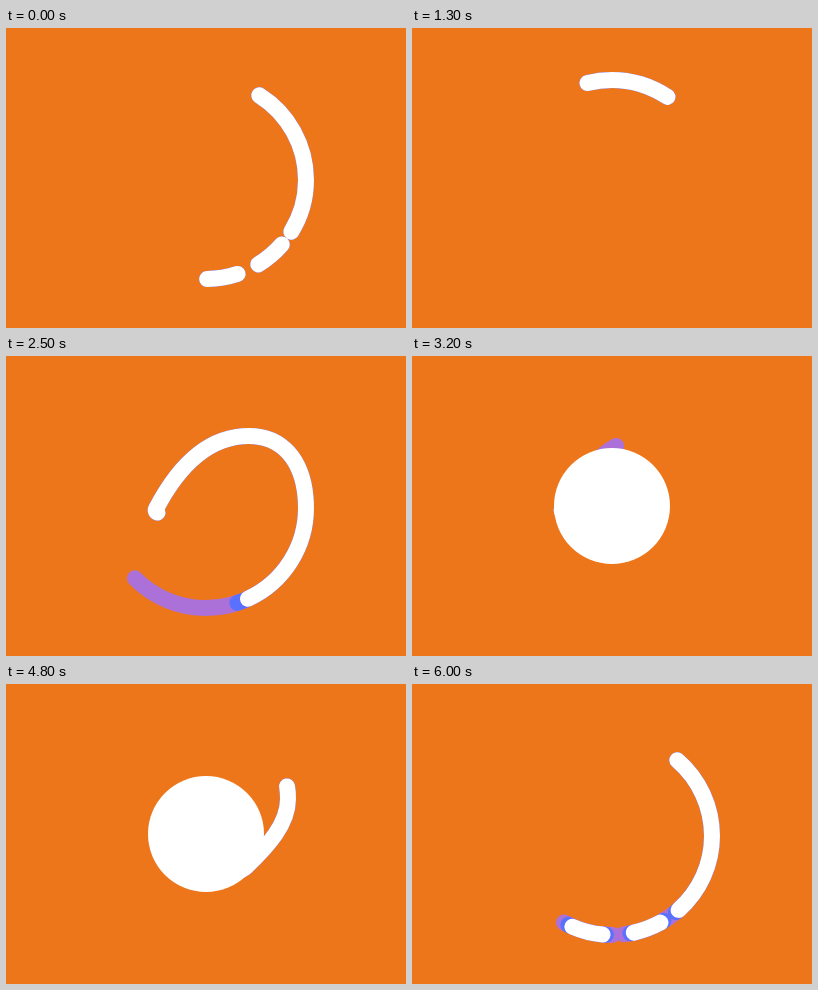
An HTML page that plays this animation: 400x300 px, repeating every 6.1 s.

```html
<!DOCTYPE html>
<html lang="en">
<head>
<meta charset="utf-8">
<title>Ribbon loop</title>
<style>
  html, body { margin: 0; width: 100%; height: 100%; overflow: hidden; background: #ed761a; }
  svg { display: block; width: 100vw; height: 100vh; }
  path { fill: none; stroke-width: 16; stroke-linecap: round; }
</style>
</head>
<body>
<svg id="stage" viewBox="0 0 400 300"></svg>
<script>
const NS = 'http://www.w3.org/2000/svg';
const LOOP = 6100;
const REST = 4200;               // the ribbon is hidden in the disc here
const DEG = 100 * Math.PI / 180; // pixels per degree on the ring

// Out of the disc, round to the bottom of the ring (180 degrees)
const LEAD = 'M200 150C203 185 225 196 240 183C262 162 282 140 282 115C282 98 278 88 268.8 81.5'
  + 'A99 98 0 0 0 101 152A99 99 0 0 0 200 251';
// One more lap, then back into the disc
const REAR = 'A100 99 0 0 0 300 152A100 100 0 0 0 100 152A100 100 0 0 0 300 152'
  + 'C300 110 280 80 243 80C205 80 175 105 150 153C147 160 165 158 200 150';

const stage = document.getElementById('stage');
function add(tag, attrs) {
  const el = document.createElementNS(NS, tag);
  for (const k in attrs) el.setAttribute(k, attrs[k]);
  return stage.appendChild(el);
}

const layers = [
  { color: '#ab71d9', exitLag: 188, entryLag: 75, shut: 24 },
  { color: '#5a70ff', exitLag: 90, entryLag: 7, shut: 8 },
  { color: '#fff', exitLag: 0, entryLag: 0, shut: 0 }
];
for (const l of layers) l.el = add('path', { d: LEAD, stroke: l.color });
const leadLen = layers[0].el.getTotalLength();
for (const l of layers) l.el.setAttribute('d', LEAD + REAR);
const total = layers[0].el.getTotalLength();
const disc = add('circle', { cx: 200, cy: 150, fill: '#fff' });

const clamp = (v, lo, hi) => Math.min(hi, Math.max(lo, v));
const toPx = a => clamp(leadLen + (a - 180) * DEG, 0, total);

// Smooth step from 0 to 1, and a hill of height 1
function ease(t, from, to) {
  const u = clamp((t - from) / (to - from), 0, 1);
  return u * u * (3 - 2 * u);
}
const hill = (t, mid, half) => Math.cos(Math.PI / 2 * clamp((t - mid) / half, -1, 1)) ** 2;

// Monotone cubic through [time, angle] points
function curve(keys) {
  const last = keys.length - 1;
  const slope = i => (keys[i + 1][1] - keys[i][1]) / (keys[i + 1][0] - keys[i][0]);
  const tan = keys.map((_, i) => {
    if (i === 0 || i === last) return 0;
    const a = slope(i - 1), b = slope(i);
    return 2 * a * b / (a + b);
  });
  return time => {
    const t = clamp(time, keys[0][0], keys[last][0]);
    let i = 0;
    while (i < last - 1 && t > keys[i + 1][0]) i++;
    const [t0, a] = keys[i], [t1, b] = keys[i + 1];
    const h = t1 - t0, u = (t - t0) / h, w = 1 - u;
    return a * w * w * (1 + 2 * u) + b * u * u * (3 - 2 * u)
      + h * u * w * (tan[i] * w - tan[i + 1] * u);
  };
}

// Angles count on anticlockwise from the top of the ring
const head = curve([[4300, -150], [4800, -56], [5600, 159], [6000, 318], [6800, 360],
  [7400, 373], [8200, 504], [8600, 761], [8700, 800]]);
const tail = curve([[4900, -150], [5600, 78], [6000, 156], [6100, 180], [6900, 295],
  [7400, 325], [8200, 385], [8600, 563], [9300, 735], [9500, 800]]);

// Cuts sit at fixed shares of the ribbon and open only for a moment
const cuts = [{ at: 0.166, width: 20 }, { at: 0.362, width: 14 }];

function drawLayer(l, t) {
  const front = head(t), back = tail(t);
  const lag = l.exitLag * hill(t, 5600, 450) + l.entryLag * hill(t, 8750, 900);
  const end = toPx(front), start = Math.min(end, toPx(back - lag));
  const stops = [];
  for (const c of cuts) {
    const mid = back + (front - back) * c.at;
    const width = c.width * hill(t, 5900, 500) - l.shut * hill(t, 5900, 200);
    const half = Math.max(0, width) / 2;
    stops.push(clamp(toPx(mid - half), start, end), clamp(toPx(mid + half), start, end));
  }
  stops.push(end);
  const dashes = stops.map((s, i) => Math.max(0, s - (i ? stops[i - 1] : start)).toFixed(2));
  l.el.setAttribute('stroke-dasharray', dashes.join(' ') + ' 9999');
  l.el.setAttribute('stroke-dashoffset', (-start).toFixed(2));
}

function draw(now) {
  let t = now % LOOP;
  if (t < REST) t += LOOP;
  for (const l of layers) drawLayer(l, t);
  const size = 1 - ease(t, 4950, 5400) + ease(t, 8620, 9000);
  disc.setAttribute('r', (58 * size).toFixed(2));
}

function tick() {
  draw(performance.now());
  requestAnimationFrame(tick);
}
tick();
</script>
</body>
</html>
```
